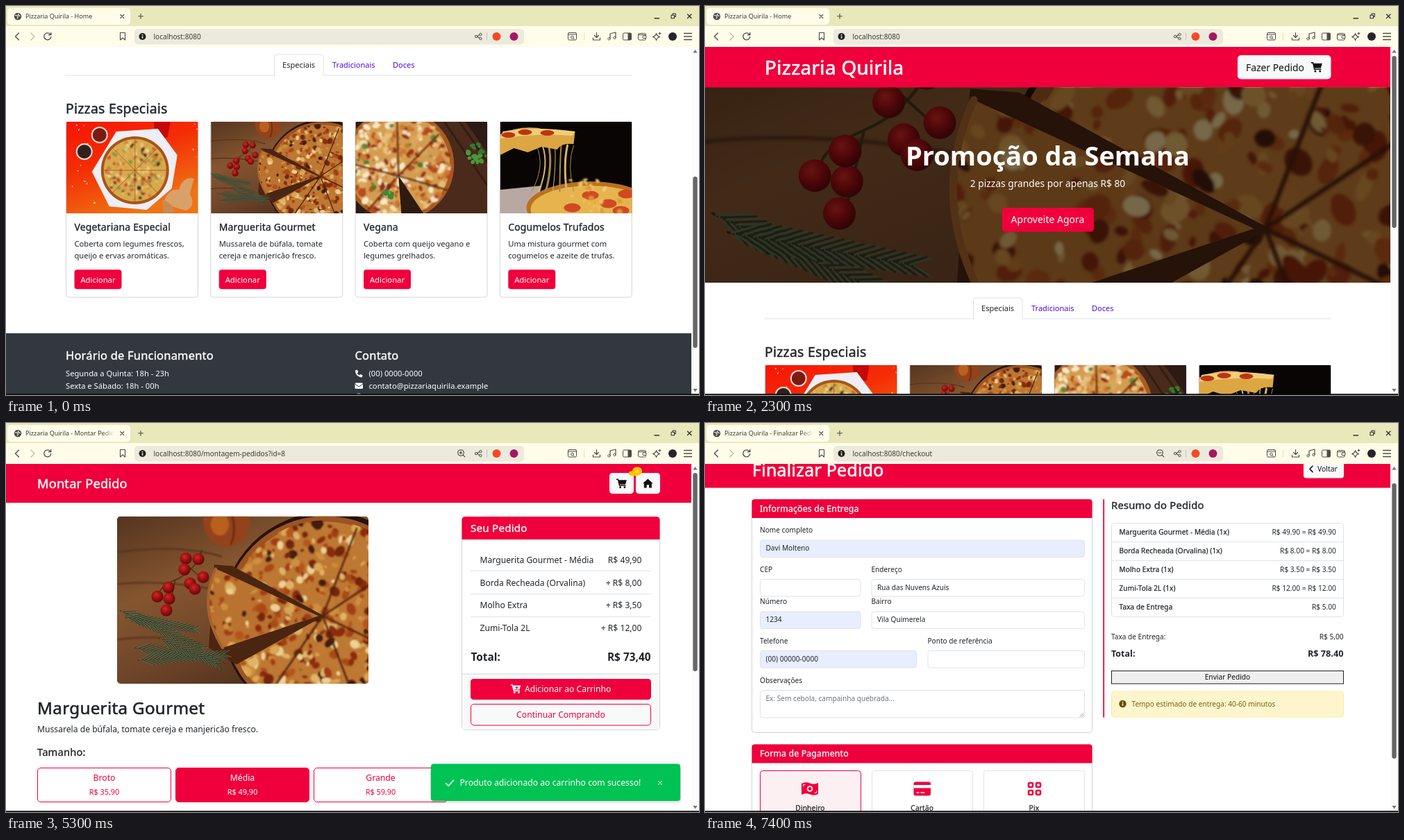
Recreate the animation shown at these times as an HTML page. Size 998 by 561 pixels, loop 8000 ms.

```html
<!DOCTYPE html>
<html lang="pt-BR">
<head>
<meta charset="utf-8">
<title>Pizzaria Quirila</title>
<style>
html, body { margin: 0; width: 100%; height: 100%; overflow: hidden; background: #fff; }
svg { display: block; }
#stage { width: 998px; height: 561px; }
text { font-family: "Noto Sans", "Open Sans", sans-serif; white-space: pre; }
.medium { stroke-width: .024em; letter-spacing: .013em; }
</style>
</head>
<body>
<svg id="stage" viewBox="0 0 998 561" xmlns="http://www.w3.org/2000/svg"></svg>
<script>
const RED = '#ef003c', INK = '#212529', LINE = '#dee2e6', LINK = '#4a0bdc';

// drawing helpers; medium weight is regular with a fine outline
const text = (x, y, size, str, fill = INK, weight = 400, anchor = 'start') =>
  `<text x="${x}" y="${y}" font-size="${size}" fill="${fill}" text-anchor="${anchor}" ` +
  (weight === 500 ? `class="medium" stroke="${fill}"` : `font-weight="${weight}"`) + `>${str}</text>`;
const mid = (x, y, size, str, fill, weight) => text(x, y, size, str, fill, weight, 'middle');
const end = (x, y, size, str, fill, weight) => text(x, y, size, str, fill, weight, 'end');
const rect = (x, y, w, h, fill, r = 0, stroke = 'none', sw = 1) =>
  `<rect x="${x}" y="${y}" width="${w}" height="${h}" rx="${r}" fill="${fill}" stroke="${stroke}" stroke-width="${sw}"/>`;
const disc = (x, y, r, fill, stroke = 'none', sw = 1) =>
  `<circle cx="${x}" cy="${y}" r="${r}" fill="${fill}" stroke="${stroke}" stroke-width="${sw}"/>`;
const oval = (x, y, rx, ry, fill) => `<ellipse cx="${x}" cy="${y}" rx="${rx}" ry="${ry}" fill="${fill}"/>`;
const shape = (d, fill, extra = '') => `<path d="${d}" fill="${fill}" ${extra}/>`;
const stroke = (d, color, w = 1) =>
  `<path d="${d}" fill="none" stroke="${color}" stroke-width="${w}" stroke-linecap="round" stroke-linejoin="round"/>`;
const at = (x, y, s, body) => `<g transform="translate(${x} ${y}) scale(${s})">${body}</g>`;
const hline = (x1, x2, y, color = LINE) => stroke(`M${x1} ${y}H${x2}`, color);
const soft = body => `<g filter="url(#soft)">${body}</g>`;

function random(seed) {
  return () => (seed = (seed * 16807) % 2147483647) / 2147483647;
}

// irregular toppings scattered over a disc
function toppings(seed, n, cx, cy, r, min, max, colors) {
  const rnd = random(seed);
  let out = '';
  for (let i = 0; i < n; i++) {
    const a = rnd() * 6.283, d = Math.sqrt(rnd()) * r, s = min + rnd() * (max - min);
    const x = (cx + d * Math.cos(a)).toFixed(1), y = (cy + d * Math.sin(a)).toFixed(1);
    out += `<ellipse cx="${x}" cy="${y}" rx="${s.toFixed(1)}" ry="${(s * (.45 + rnd() * .5)).toFixed(1)}" ` +
      `transform="rotate(${Math.round(rnd() * 180)} ${x} ${y})" fill="${colors[i % colors.length]}"/>`;
  }
  return out;
}

function sprig(x, y, angle, len) {
  let out = stroke(`M0 0H${len}`, '#33301c', 1.3);
  for (let i = 2; i < len; i += 3) {
    const k = 17 * (1 - i / len * .4);
    out += stroke(`M${i} 0l${k} ${-k * .5}M${i + 2} 0l${k} ${k * .45}`, i % 2 ? '#333c28' : '#5c684b', 1);
  }
  return `<g transform="translate(${x} ${y}) rotate(${angle})">${out}</g>`;
}

// pictures
const CHEESE = ['#dba552', '#a23c12', '#cd8f3f', '#ecd093', '#8c2c0c', '#c27a30', '#b5551c', '#451b0b', '#e0b468', '#a84a16', '#73280e'];
const SLICE = 'M142 76Q116 132 152 190L290 144Z';

function margherita() {
  const vine = [[99, 61], [97, 77], [117, 62], [124, 88], [105, 97], [112, 105], [58, 116], [75, 119], [71, 136], [74, 103]];
  const cuts = 'M296 144L230 241M296 144L332 238M296 144L362 176M296 144L362 100M296 144L345 18';
  return rect(0, 0, 362, 242, 'url(#wood)') +
    soft(stroke('M0 52Q90 40 150 58M0 98Q60 92 130 104M0 178Q70 170 120 184', '#54301a', 2) +
      shape('M124 0Q122 38 156 44Q196 40 190 0Z', '#94421a') + oval(148, 12, 13, 16, '#b8601f') +
      stroke('M166 0Q172 22 164 40', '#6f2c10', 3)) +
    disc(303, 147, 153, '#26130b') + disc(300, 147, 147, '#9c5424') + disc(300, 147, 139, '#bd7833') +
    `<g clip-path="url(#pie)">${soft(toppings(77, 520, 300, 147, 142, 2.5, 9, CHEESE))}</g>` +
    soft(stroke(cuts, '#4f220e', 2.4)) +
    shape('M166 72L298 144L172 214L132 190L140 70Z', '#4a2511') +
    shape(SLICE, '#b9722f') +
    `<g clip-path="url(#slice)">${soft(toppings(41, 170, 195, 134, 85, 2.5, 8, CHEESE))}</g>` +
    stroke('M142 76Q116 132 152 190', '#a8622d', 4) +
    stroke('M122 50Q112 80 84 92T62 116M100 70L122 90M84 92L74 136', '#453618', 1.6) +
    vine.map(([x, y]) => disc(x, y, 8.6, 'url(#tomato)')).join('') +
    sprig(4, 136, 25, 130) + sprig(12, 146, 10, 100) + sprig(26, 190, 8, 120) + sprig(30, 208, -4, 125) + sprig(60, 176, 24, 90);
}

function veggie() {
  return rect(0, 0, 190, 132, 'url(#hot)') +
    toppings(9, 70, 95, 66, 110, .4, 1.6, ['#ffd9b8', '#ffb27d']) +
    shape('M126 0H150L146 22Q134 26 128 20Z', '#c40808') +
    shape('M72 14L132 10L160 48L152 96L116 127L62 122L37 72Z', '#eeeef4') +
    disc(99, 70, 49, '#a85418') + disc(99, 70, 45, '#d9a94e') +
    soft(toppings(23, 200, 99, 70, 42, 1, 3.4, ['#c8382f', '#ecd07c', '#87913c', '#f0d88e', '#c47e2e', '#3d2a24', '#d9a347'])) +
    stroke('M99 24V116M54 70H144M67 38L131 102M67 102L131 38', '#9c5a22', .8) +
    [[48, 19], [26, 43]].map(([x, y], i) => disc(x, y, 12, '#e7ddd6') + disc(x, y, 10, i ? '#33201c' : '#7c1a12')).join('') +
    shape('M140 118Q146 96 162 98Q168 78 184 82L178 104Q188 122 172 128Z', '#d9a067') +
    shape('M138 112Q152 116 156 130L140 132Z', '#c98b52');
}

function vegan() {
  return rect(0, 0, 190, 132, '#2b1b14') + shape('M84 0H158L190 44V132H60Z', '#4a2a1a') +
    stroke('M128 0L190 92M150 0L190 58', '#341d12', 3) +
    disc(62, 62, 80, '#a85a24') + disc(62, 62, 74, '#d39c50') +
    soft(toppings(63, 340, 62, 62, 74, 1.8, 6.5, ['#f3dfb4', '#b84a1e', '#e8bf78', '#cc7a30', '#f6e8c8', '#93331a', '#dba65a']) +
      toppings(17, 16, 62, 62, 64, 2, 5, ['#4d7a2b', '#5f8a32'])) +
    shape('M62 78L98 132H66Z', '#2f1a10') +
    soft(stroke('M62 78L138 100M62 78L14 132M62 78L0 62M62 78L60 0M62 78L120 18', '#5c2a12', 2)) +
    toppings(31, 18, 176, 46, 15, 2, 6, ['#2f7a2d', '#49973b']) + toppings(5, 8, 46, 105, 8, 2, 5, ['#3c8a35']);
}

function stretchy() {
  let strings = '';
  for (let i = 0; i < 7; i++) strings += stroke(`M${52 + i * 9} 34Q${66 + i * 5} 62 ${46 + i * 10} 100`, i % 2 ? '#d9b469' : '#a98748', i % 3 + 1);
  return rect(0, 0, 190, 132, '#080504') + shape('M0 98L60 92L50 132H0Z', '#b9a8a1') +
    oval(130, 124, 92, 38, '#b9701f') + oval(130, 126, 86, 34, '#e6b34c') + strings +
    shape('M0 18Q30 4 60 10L108 14L106 32Q88 30 82 40L60 36L40 44L20 38L0 48Z', '#dca743') +
    shape('M4 14Q50 6 108 14L104 20Q50 16 0 24Z', '#f0cd78') +
    [[36, 15], [68, 16], [12, 19]].map(([x, y]) => oval(x, y, 10, 4, '#bd3417')).join('') +
    [[130, 106], [156, 118], [182, 104], [104, 124], [174, 128]].map(([x, y]) => oval(x, y, 12, 6.5, '#cf4a22')).join('') +
    soft(toppings(8, 40, 130, 120, 46, 1.5, 5, ['#f3d27c', '#efc15f', '#d9963a']));
}

const photo = (x, y, w, h, view, body) =>
  `<svg x="${x}" y="${y}" width="${w}" height="${h}" viewBox="0 0 ${view}" preserveAspectRatio="xMidYMid slice">${body}</svg>`;
const MARG = '<use href="#marg"/>';

// icons
const cart = c => shape('M3.2 1.8H15.8L13.9 8.4H4.9Z', c) + stroke('M.5 .9H2.6L4.8 10.2H13.8', c, 1.6) + disc(5.9, 13, 1.5, c) + disc(12.7, 13, 1.5, c);
const house = c => shape('M0 7.4L8 0L16 7.4H14V14H9.8V9.4H6.2V14H2V7.4Z', c);
const info = (x, y, r, c, bg) => disc(x, y, r, c) + rect(x - .7, y - .6, 1.5, 3.4, bg) + disc(x, y - 2.3, .9, bg);
const lens = (x, sign) => disc(x, 43, 4.3, 'none', '#3d3d38', 1.1) +
  stroke(`M${x + 3.2} 46.2l2.6 2.6M${x - 2} 43h4${sign === '+' ? `M${x} 41v4` : ''}`, '#3d3d38', 1.1);

// browser window
function chrome() {
  const c = '#4c4c46', dark = '#33332e', bar = '#fffcea', field = '#eceadc';
  return rect(0, 0, 998, 30, '#e8e8bb') + rect(0, 29, 998, 30, bar) +
    rect(2, 3, 177, 24, bar, 5) + disc(17, 15, 5.2, '#4b4b48') +
    stroke('M13.4 13.5l3 .5l1 2l-1.2 2M18 11.2l-.6 1.8l3 1.6', bar, 1.1) +
    stroke('M164.8 12.5l5 5m0-5l-5 5', c, 1.1) + stroke('M190.5 14.8h7m-3.5-3.5v7', c, 1.1) +
    stroke('M934 17.8h6.5', dark, 1.4) + stroke('M958 13.2h4.5v4.5h-4.5zM960 13v-2h4.3v4.4h-1.6', dark, 1.1) +
    stroke('M981.5 12l5.5 5.5m0-5.5l-5.5 5.5', dark, 1.4) +
    stroke('M18.5 39l-5 5l5 5', c, 1.3) + stroke('M36 39l5 5l-5 5', '#bdbba8', 1.3) +
    stroke('M63.6 40.5a5 5 0 1 0 1.2 4M64.8 38.5v3.2h-3.3', c, 1.3) +
    stroke('M164.5 38.5h7v10.5l-3.5-3l-3.5 3z', c, 1.1) +
    rect(185, 33, 561, 22.5, field, 5) + info(196.5, 44, 5, '#20201e', field) +
    stroke('M683 41l-5 3l5 3', c, 1.1) + [[683.5, 41], [677, 44], [683.5, 47]].map(([x, y]) => disc(x, y, 1.7, field, c)).join('') +
    stroke('M692.5 39v10', '#c7c5b5') + disc(706.5, 44, 6, '#f5492a') + disc(731.5, 44, 6, '#a5185f') +
    rect(809.5, 38.5, 12, 10.5, 'none', 1.5, c) + stroke('M810 41h11M817 46.5l1.5 1.5', c) + disc(815.5, 45, 1.8, 'none', c) +
    stroke('M832.5 39v10', '#e3dfb4') +
    stroke('M850.5 38.5v7m-3-3l3 3l3-3M845.5 46v3h10v-3', c, 1.2) +
    stroke('M870 47v-7l8-2v7.5', c, 1.2) + disc(868.5, 47.3, 1.7, 'none', c) + disc(876.5, 45.8, 1.7, 'none', c) +
    rect(888.5, 39, 12, 10, 'none', 1.5, c) + rect(895.5, 39, 5, 10, c) +
    rect(910.5, 39.5, 11, 9.5, 'none', 2, c) + rect(917, 43, 5, 3.5, bar, 1, c) + stroke('M911 41.5h10', c) +
    stroke('M936.5 39.5q1 4 5 5q-4 1-5 5q-1-4-5-5q4-1 5-5zM941.5 38v3m-1.5-1.5h3', c, 1.1) +
    disc(960, 44, 6, '#25252a') + stroke('M976.5 39.5h11M976.5 44h11M976.5 48.5h11', c, 1.3);
}

function windowState(s) {
  return `<g clip-path="url(#tab)">${text(28, 18.3, 9, s.title, '#3b3b38')}</g>` +
    (s.title.length > 24 ? rect(138, 8, 20, 14, 'url(#fade)') : '') +
    text(212.5, 47.5, 10.05, s.url, '#3a3a38') + (s.zoom ? lens(655, s.zoom) : '') +
    rect(987, 59, 11, 501, '#fbfbfb') + rect(989.3, s.thumb[0], 6.4, s.thumb[1] - s.thumb[0], '#666', 3.2) +
    shape('M989.3 67.5h6.4l-3.2-4.5z', '#777') + shape('M989.3 552h6.4l-3.2 4.5z', '#777');
}

// pages
function home() {
  const cards = [
    ['Vegetariana Especial', 'Coberta com legumes frescos,', 'queijo e ervas aromáticas.', '190 132', veggie()],
    ['Marguerita Gourmet', 'Mussarela de búfala, tomate', 'cereja e manjericão fresco.', '362 242', MARG],
    ['Vegana', 'Coberta com queijo vegano e', 'legumes grelhados.', '190 132', vegan()],
    ['Cogumelos Trufados', 'Uma mistura gourmet com', 'cogumelos e azeite de trufas.', '190 132', stretchy()]
  ];
  return rect(0, 59, 987, 59, RED) + text(86, 98.5, 27.8, 'Pizzaria Quirila', '#fff', 500) +
    rect(767, 71, 134.5, 34.5, '#f8f9fa', 5) + text(779, 93.7, 13.9, 'Fazer Pedido', '#111') + at(873, 81, 1, cart('#111')) +
    photo(0, 117.5, 987, 281.5, '362 242', MARG) + rect(0, 117.5, 987, 281.5, 'rgba(0,0,0,.5)') +
    mid(493.5, 230, 38, 'Promoção da Semana', '#fff', 600) +
    mid(493.5, 261.3, 13.8, '2 pizzas grandes por apenas R$ 80', '#fff', 300) +
    rect(428, 291, 132, 34.5, RED, 4.5) + mid(493.5, 313.3, 14, 'Aproveite Agora', '#fff') +
    hline(86, 901.5, 451) + shape('M386.5 452V425Q386.5 421 390.5 421H453Q457 421 457 425V452', '#fff', `stroke="${LINE}"`) +
    rect(387, 450, 69.5, 3, '#fff') +
    text(398, 440.3, 11.1, 'Especiais') + text(470, 440.3, 11, 'Tradicionais', LINK) + text(557, 440.3, 11, 'Doces', LINK) +
    text(86, 506, 19.4, 'Pizzas Especiais', INK, 500) +
    cards.map(([name, a, b, view, pic], i) => {
      const x = 86.5 + i * 208.25;
      return rect(x, 518, 190, 253, '#fff', 4, '#d3d5d8') + photo(x + .5, 518, 189.5, 132, view, pic) +
        text(x + 12, 675, 13.95, name, INK, 500) + text(x + 12, 697.7, 11.15, a) + text(x + 12, 715.3, 11.15, b) +
        rect(x + 12, 731.3, 68, 28, RED, 4) + mid(x + 46, 749.5, 11.3, 'Adicionar', '#fff');
    }).join('') +
    rect(0, 823, 987, 120, '#32383e') +
    text(86, 860.7, 16.45, 'Horário de Funcionamento', '#fff', 500) + text(502.5, 860.7, 16.45, 'Contato', '#fff', 500) +
    text(86, 885, 11.2, 'Segunda a Quinta: 18h - 23h', '#fff') + text(86, 902.7, 11.2, 'Sexta e Sábado: 18h - 00h', '#fff') +
    text(522.5, 885, 11.2, '(00) 0000-0000', '#fff') + text(522.5, 902.7, 11.2, 'contato@pizzariaquirila.example', '#fff') +
    shape('M503 876.5l2.800-1l1.600 3.400l-1.600 1.400q1 2.200 3.200 3.200l1.400-1.600l3.200 1.500l-.8 3q-10-.4-9.800-9.900z', '#fff') +
    rect(502.5, 894.5, 11.5, 8.6, '#fff', 1.5) + stroke('M503 896.5l5.3 3.6l5.3-3.6', '#32383e') +
    disc(508, 914, 4.5, '#fff');
}

function builder() {
  const rows = [['Marguerita Gourmet - Média', 'R$ 49,90'], ['Borda Recheada (Orvalina)', '+ R$ 8,00'], ['Molho Extra', '+ R$ 3,50'], ['Zumi-Tola 2L', '+ R$ 12,00']];
  const sizes = [['Broto', 'R$ 35,90'], ['Média', 'R$ 49,90'], ['Grande', 'R$ 59,90']];
  return rect(0, 59, 987, 56, RED) + text(45, 94, 18.15, 'Montar Pedido', '#fff', 500) +
    rect(869, 72, 35, 30, '#f8f9fa', 4.5) + at(879, 80.5, .94, cart('#111')) +
    rect(907, 72, 35, 30, '#f8f9fa', 4.5) + at(917, 80.5, .92, house('#111')) +
    rect(897, 69.5, 14, 6.5, '#ffc400', 3) + rect(902, 63.5, 14, 12, '#ffc400', 6) + mid(909, 72, 6.5, '4', '#fff3b8') +
    `<g clip-path="url(#round)">${photo(160, 134.5, 362, 241.5, '362 242', MARG)}</g>` +
    text(45, 419.8, 24.2, 'Marguerita Gourmet', INK, 500) +
    text(45, 446, 12.15, 'Mussarela de búfala, tomate cereja e manjericão fresco.') +
    text(45, 479.7, 14.7, 'Tamanho:', INK, 500) +
    sizes.map(([name, price], i) => {
      const x = 45.5 + i * 199, on = i === 1, c = on ? '#fff' : RED;
      return rect(x, 497.5, 192, 49, on ? RED : '#fff', 4.5, RED) +
        mid(x + 96, 515.7, 12.2, name, c) + mid(x + 96, 535.7, 10.9, price, c);
    }).join('') +
    rect(656.5, 135.5, 285, 307, '#fff', 5, '#d3d6d9') +
    shape('M656.5 168V140Q656.5 135 661.5 135H936.5Q941.5 135 941.5 140V168Z', RED) +
    text(669, 157, 15.2, 'Seu Pedido', '#fff', 500) +
    rows.map(([a, b], i) => text(682.5, 201.7 + i * 32.8, 12.15, a) + end(915.5, 201.7 + i * 32.8, 12.15, b) +
      (i < 3 ? hline(669, 928.5, 213.5 + i * 33) : '')).join('') +
    text(669.5, 342.7, 15.4, 'Total:', INK, 700) + end(928.5, 342.7, 15.4, 'R$ 73,40', INK, 700) +
    rect(657, 362, 284, 80, '#f8faf9', 4) + hline(657, 941, 362, '#d3d6d9') +
    rect(669, 369, 260, 30, RED, 4.5) + at(727, 377, .9, cart('#fff') + stroke('M9.5 3.3v3.6M7.7 5.1h3.6', RED, 1.2)) +
    text(747, 388, 12.15, 'Adicionar ao Carrinho', '#fff') +
    rect(669.5, 405.5, 259, 30.5, '#f8faf9', 4.5, RED) + mid(799, 425.2, 12.15, 'Continuar Comprando', RED) +
    rect(611, 494, 362, 55, 'rgba(0,0,0,.07)', 6) + rect(611, 493, 361, 53, 'rgba(0,0,0,.1)', 5) +
    rect(612, 491.5, 359, 53.5, '#00c353', 4) +
    stroke('M633.5 519.5l3.7 3.8l7.3-8', '#fff', 1.6) +
    text(653.5, 523, 12.2, 'Produto adicionado ao carrinho com sucesso!', '#fff') +
    stroke('M939.5 516.5l5 5m0-5l-5 5', '#b9f0cd', 1.1);
}

function checkout() {
  const field = (x, y, w, label, value = '', filled) => text(x, y - 10.3, 10.1, label) +
    rect(x + .5, y + .5, w - 1, 24.5, filled ? '#e8eefe' : '#fff', 3.5, LINE) + text(x + 8.5, y + 15.7, 10.1, value);
  const panel = (y, h, title) => rect(67.5, y, 490, h, '#fff', 4, '#cfd2d5') +
    shape(`M67.5 ${y + 27}V${y + 4}Q67.5 ${y} 71.5 ${y}H553.5Q557.5 ${y} 557.5 ${y + 4}V${y + 27}Z`, RED) +
    text(79, y + 17.7, 12.3, title, '#fff', 500);
  const rows = [['Marguerita Gourmet - Média (1x)', 'R$ 49.90 = R$ 49.90'], ['Borda Recheada (Orvalina) (1x)', 'R$ 8.00 = R$ 8.00'],
    ['Molho Extra (1x)', 'R$ 3.50 = R$ 3.50'], ['Zumi-Tola 2L (1x)', 'R$ 12.00 = R$ 12.00'], ['Taxa de Entrega', 'R$ 5.00']];
  const pale = '#fdf0f3';
  const cash = shape('M139 520Q145 517 151 519.5T163 519V535Q157 538 151 535.5T139 536Z', RED) + disc(151, 527.5, 4.3, pale) + disc(151, 527.5, 2.4, RED) +
    stroke('M141.5 524v-2.5h2.5M160.5 531v2.5h-2.5', pale);
  const card = rect(300.5, 517.5, 24.5, 20, RED, 3) + rect(300.5, 522, 24.5, 4.5, '#fff') + stroke('M305 533h3M311 533h5', '#fff', 1.3);
  const grid = [466, 477].map(x => [519, 530].map(y => rect(x, y, 6, 6, 'none', 1.5, RED, 2.6)).join('')).join('');
  const pay = [['Dinheiro', cash], ['Cartão', card], ['Pix', grid]];
  return rect(0, 59, 987, 34.5, RED) + text(68, 76.6, 24.8, 'Finalizar Pedido', '#fff', 500) +
    rect(862, 50, 58, 29.5, '#f8f9fa', 4) + stroke('M875 62l-4 4.3l4 4.3', '#111', 1.6) + text(882, 70, 10.4, 'Voltar', '#111') +
    panel(110, 336.5, 'Informações de Entrega') +
    field(79, 168.5, 468, 'Nome completo', 'Davi Molteno', true) +
    field(79, 225, 145.5, 'CEP') + field(239.5, 225, 307.5, 'Endereço', 'Rua das Nuvens Azuis') +
    field(79, 271.5, 145.5, 'Número', '1234', true) + field(239.5, 271.5, 307.5, 'Bairro', 'Vila Quimerela') +
    field(79, 328, 226, 'Telefone', '(00) 00000-0000', true) + field(320.5, 328, 226.5, 'Ponto de referência') +
    text(79, 374.5, 10.1, 'Observações') + rect(79.5, 385.5, 467, 39.5, '#fff', 3.5, LINE) +
    text(87.5, 400.7, 10.1, 'Ex: Sem cebola, campainha quebrada...', '#6c757d') + stroke('M540 423.5l5-5M543 423.5l2-2', '#888', .9) +
    panel(463.5, 140, 'Forma de Pagamento') +
    pay.map(([name, icon], i) => rect(79.5 + i * 161, 501.5, 145, 80, i ? '#fff' : pale, 4, i ? LINE : RED) +
      icon + mid(151.5 + i * 161.2, 559.3, 10.2, name, INK, 500)).join('') +
    rect(573.3, 110, 1.8, 314.5, RED) + text(585, 124, 14.8, 'Resumo do Pedido', INK, 500) +
    rect(585.5, 144.5, 334, 135, '#fff', 4, LINE) +
    rows.map(([a, b], i) => text(596.5, 160.7 + i * 27, 10, a, INK, 500) + end(908.8, 160.7 + i * 27, 10.15, b) +
      (i ? hline(586, 919, 144.5 + i * 27) : '')).join('') +
    text(585, 312, 10.1, 'Taxa de Entrega:') + end(919.5, 312, 10.1, 'R$ 5,00') +
    text(585, 336.5, 12.5, 'Total:', INK, 700) + end(919.5, 336.5, 12.7, 'R$ 78.40', INK, 700) +
    rect(585.5, 357.5, 334, 18.5, '#efefef', 0, '#222') + mid(752.5, 370, 10.2, 'Enviar Pedido', '#111') +
    rect(585.5, 387, 334, 37, '#fdf5cc', 4, '#fbeaa6') + info(601.5, 405, 5.2, '#664d03', '#fdf5cc') +
    text(614.5, 408.7, 10.1, 'Tempo estimado de entrega: 40-60 minutos', '#7b6112');
}

const TITLE = 'Pizzaria Quirila - ';
const scenes = [
  { until: 500, page: 'home', scroll: 351, title: TITLE + 'Home', url: 'localhost:8080', thumb: [246, 493] },
  { until: 3500, page: 'home', scroll: 0, title: TITLE + 'Home', url: 'localhost:8080', thumb: [72, 320] },
  { until: 6500, page: 'builder', scroll: 0, title: TITLE + 'Montar Pedido', url: 'localhost:8080/montagem-pedidos?id=8', zoom: '+', thumb: [72, 358] },
  { until: 8000, page: 'checkout', scroll: 0, title: TITLE + 'Finalizar Pedido', url: 'localhost:8080/checkout', zoom: '-', thumb: [87, 484] }
];
const pages = { home, builder, checkout };

const stops = list => list.map(([o, c, a = 1]) => `<stop offset="${o}" stop-color="${c}" stop-opacity="${a}"/>`).join('');
const gradient = (id, dir, list) => `<linearGradient id="${id}" ${dir}>${stops(list)}</linearGradient>`;
const clip = (id, body) => `<clipPath id="${id}">${body}</clipPath>`;

const stage = document.getElementById('stage');
stage.innerHTML = '<defs>' +
  gradient('wood', 'x2=".6" y2="1"', [[0, '#54341f'], [.4, '#85552f'], [.7, '#70462a'], [1, '#4f301c']]) +
  gradient('hot', 'x2=".5" y2="1"', [[0, '#f81505'], [.45, '#f52c06'], [1, '#ef7412']]) +
  gradient('fade', 'x2="1"', [[0, '#fffcea', 0], [.9, '#fffcea']]) +
  `<radialGradient id="tomato" cx=".4" cy=".35" r=".65">${stops([[0, '#cf2a26'], [.5, '#a30f12'], [1, '#5f0a0b']])}</radialGradient>` +
  '<filter id="soft"><feGaussianBlur stdDeviation=".8"/></filter>' +
  clip('pie', disc(300, 147, 141, '#000')) + clip('slice', shape(SLICE, '#000')) +
  clip('tab', rect(28, 4, 128, 24, '#000')) + clip('view', rect(0, 59, 987, 501, '#000')) +
  clip('round', rect(160, 134.5, 362, 241.5, '#000', 5)) +
  `<g id="marg">${margherita()}</g></defs>` + rect(0, 0, 998, 561, '#fff') +
  '<g clip-path="url(#view)">' + Object.keys(pages).map(k => `<g id="${k}">${pages[k]()}</g>`).join('') + '</g>' +
  chrome() + '<g id="state"></g>' + rect(0, 559.3, 998, 1.7, '#0c0c0c');

let shown = null;
function draw(time) {
  const scene = scenes.find(s => time % 8000 < s.until);
  if (scene === shown) return;
  shown = scene;
  for (const k in pages) document.getElementById(k).style.display = k === scene.page ? '' : 'none';
  document.getElementById(scene.page).setAttribute('transform', `translate(0 ${-scene.scroll})`);
  document.getElementById('state').innerHTML = windowState(scene);
}
function tick() {
  draw(performance.now());
  requestAnimationFrame(tick);
}
tick();
</script>
</body>
</html>
```
